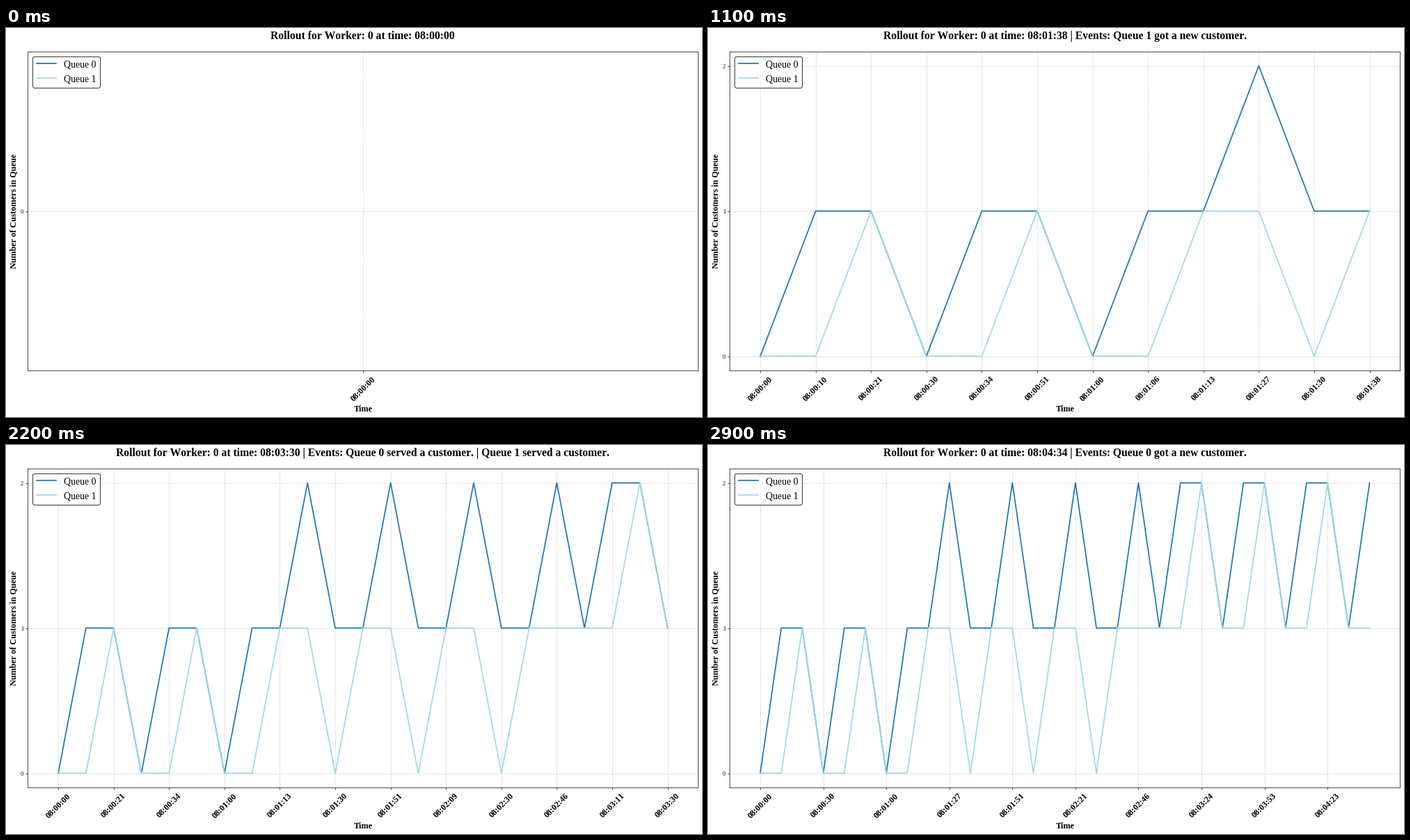
Write a matplotlib script that moves like this. It is 1000 px wide and 560 px high and loops after 3000 ms.

```python
import matplotlib.pyplot as plt
from matplotlib.animation import FuncAnimation

WIDTH, HEIGHT, DPI = 1000, 560, 62.5
plt.rcParams["font.family"] = "Liberation Serif"
plt.rcParams["text.kerning_factor"] = 6  # evenly set text, practically no kerning

# Seconds after 08:00:00 at which a queue changes, and the lengths from then on.
SECONDS = [0, 10, 21, 30, 34, 51, 60, 66, 73, 87, 90, 98, 111, 120, 129,
           141, 150, 157, 166, 180, 191, 204, 210, 221, 233, 240, 251, 263, 270, 274]
QUEUES = [[int(c) for c in "011011011211211211212212212212"],
          [int(c) for c in "001001001101101101111211211211"]]
COLORS = ["#1f77b4", "#9edae5"]


def clock(seconds):
    return f"08:{seconds // 60:02d}:{seconds % 60:02d}"


def title_for(i):
    parts = [f"Rollout for Worker: 0 at time: {clock(SECONDS[i])}"]
    if i > 0:
        events = []
        for k, queue in enumerate(QUEUES):
            if queue[i] > queue[i - 1]:
                events.append(f"Queue {k} got a new customer.")
            elif queue[i] < queue[i - 1]:
                events.append(f"Queue {k} served a customer.")
        parts.append("Events: " + " | ".join(events))
    return " | ".join(parts)


def padded(top):
    """Axis limits for 0..top with a five percent margin."""
    margin = 0.05 * top if top else 0.055
    return -margin, top + margin


fig = plt.figure(figsize=(WIDTH / DPI, HEIGHT / DPI), dpi=DPI, facecolor="white")
left, right, bottom, top = 31.3, 994.3, 66.6, 526.4
ax = fig.add_axes([left / WIDTH, bottom / HEIGHT,
                   (right - left) / WIDTH, (top - bottom) / HEIGHT])
lines = [ax.plot([], [], color=color, lw=2, label=f"Queue {k}")[0]
         for k, color in enumerate(COLORS)]
ax.set_xlabel("Time", fontsize=14, fontweight="bold")
ax.set_ylabel("Number of Customers in Queue", fontsize=14, fontweight="bold")
ax.grid(True, linestyle="--", alpha=0.6)
ax.legend(loc="upper left", fontsize=16, edgecolor="black", framealpha=0.9,
          labelspacing=0.57)


def update(i):
    for line, queue in zip(lines, QUEUES):
        line.set_data(range(i + 1), queue[:i + 1])
    longest = max(max(queue[:i + 1]) for queue in QUEUES)
    ticks = range(0, i + 1, max(1, (i + 1) // 10))
    ax.set_xticks(ticks, [clock(SECONDS[t]) for t in ticks],
                  rotation=45, fontsize=14, fontweight="bold")
    ax.set_yticks(range(longest + 1))
    ax.set_xlim(padded(i))
    ax.set_ylim(padded(longest))
    ax.set_title(title_for(i), fontsize=18, fontweight="bold", pad=20)
    return lines


anim = FuncAnimation(fig, update, frames=len(SECONDS), interval=100,
                     repeat=True, repeat_delay=0, blit=False)
plt.show()
```
